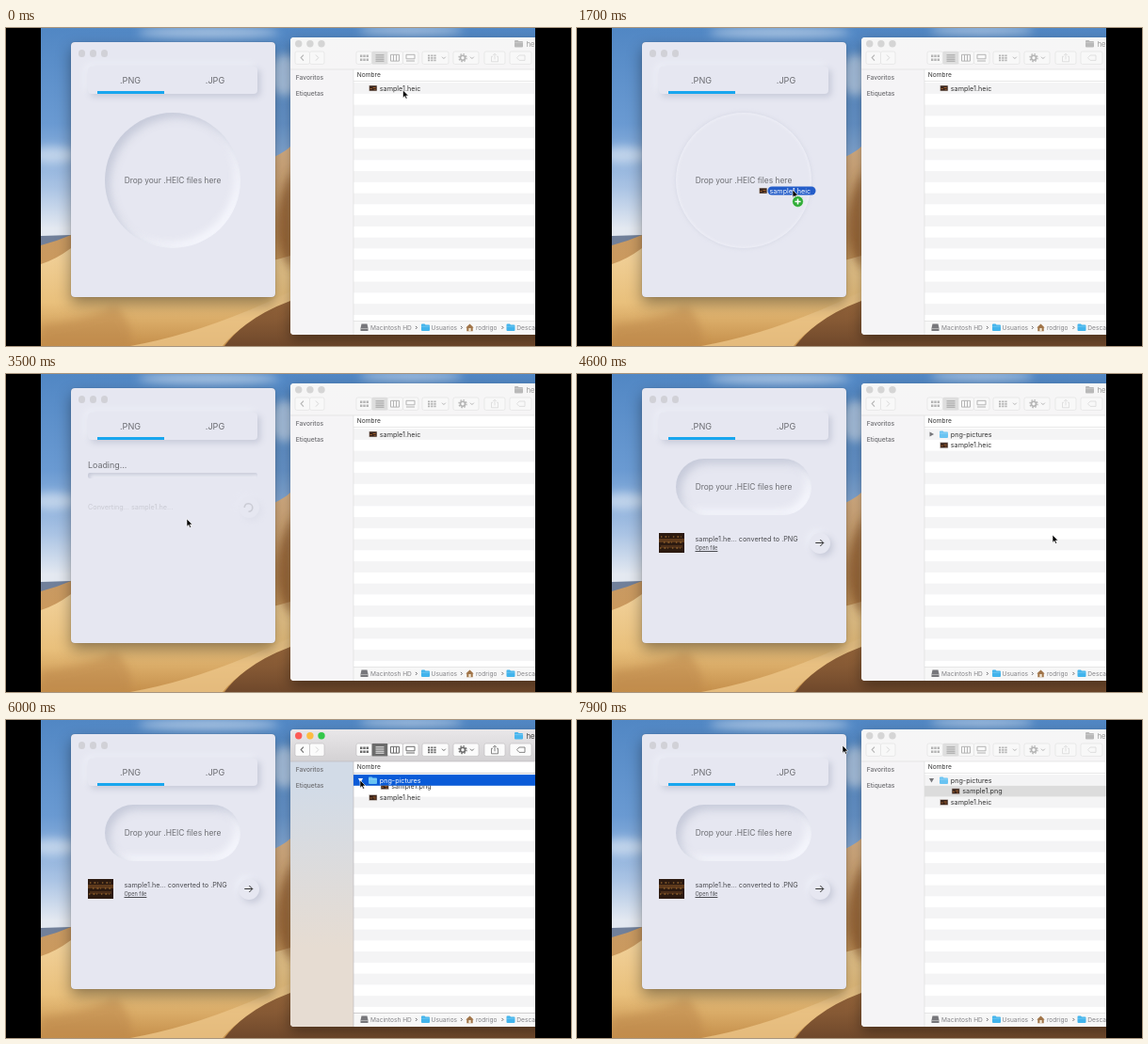
An HTML page that plays this animation: 600 by 338 pixels, repeating every 8 s.

```html
<!DOCTYPE html>
<html lang="es">
<head>
<meta charset="utf-8">
<title>HEIC converter</title>
<style>
html, body { margin: 0; width: 100%; height: 100%; overflow: hidden; background: #000; }
#scene { position: absolute; left: 37px; top: 0; width: 525px; height: 338px; overflow: hidden;
  font-family: Inter, Roboto, sans-serif;
  --bar1: #f6f6f6; --bar2: #f6f5f6; --side1: #f5f4f6; --side2: #f5f4f6; --line: #dfdfdf;
  --glyph: #b4b4b4; --dim: #dadada; --btn: #f8f8f8; --on: #dedede; --onGlyph: #9a9a9a;
  --r: #d5d5d5; --y: #d5d5d5; --g: #d5d5d5; --title: #9c9c9c; --dir: #b9b9b9; --pick: #dcdcdc; --pickText: #333; }
#scene.active {
  --bar1: #e9e7e9; --bar2: #d3d1d3; --side1: #d2dbe7; --side2: #e6dcd2; --line: #bdbbbd;
  --glyph: #6b6b6b; --dim: #6b6b6b; --btn: #fbfbfb; --on: #6c6c6c; --onGlyph: #fff;
  --r: #fc5b57; --y: #fdbc40; --g: #34c84a; --title: #444; --dir: #49b6ee; --pick: #0a5bd8; --pickText: #fff; }
svg { position: absolute; left: 0; top: 0; }
#app { position: absolute; left: 32px; top: 15px; width: 216.5px; height: 271px; border-radius: 4px;
  background: #e6e7f1; color: #6c6d72; box-shadow: 0 7px 16px rgba(0,0,0,.38), 0 0 1px rgba(0,0,0,.4); }
#app div { position: absolute; box-sizing: border-box; white-space: nowrap; }
.dot { top: 8px; width: 7.6px; height: 7.6px; border-radius: 50%; background: #d1d1d7; }
.tabs, .round { box-shadow: 3px 3px 7px #c6c9d8, -3px -3px 7px #eef0f8; background: #e6e7f1; }
.tabs { left: 18px; top: 26px; width: 180px; height: 29px; border-radius: 4px; }
.tab { top: 0; width: 90px; line-height: 29px; text-align: center; font-size: 9.1px; }
.mark { left: 10px; top: 26px; width: 71px; height: 3.4px; background: #18a6ee; }
#ring { left: 36px; top: 75px; width: 144px; display: flex; align-items: center; justify-content: center; font-size: 8.4px; }
.round { left: 177.5px; width: 22px; height: 22px; border-radius: 50%; }
.track { left: 18px; top: 89.5px; width: 180px; height: 6px; border-radius: 2px; box-shadow: inset 2px 2px 4px #c6c9d7, inset -2px -2px 4px #f1f2fa; }
.small { font-size: 7.25px; line-height: 10px; }
</style>
</head>
<body>
<div id="scene">
<svg width="525" height="338" viewBox="37 0 525 338">
  <defs>
    <linearGradient id="sky" x2="0" y2="1">
      <stop offset="0" stop-color="#5187c4"/><stop offset=".3" stop-color="#6a9ad2"/>
      <stop offset=".5" stop-color="#a9c3e4"/><stop offset=".63" stop-color="#e4e9f1"/>
    </linearGradient>
    <linearGradient id="sand" gradientUnits="userSpaceOnUse" x1="0" y1="130" x2="0" y2="338">
      <stop offset="0" stop-color="#dcb488"/><stop offset=".45" stop-color="#c99a62"/><stop offset="1" stop-color="#cf9750"/>
    </linearGradient>
    <linearGradient id="gold" gradientUnits="userSpaceOnUse" x1="0" y1="235" x2="0" y2="338">
      <stop offset="0" stop-color="#f1d19a"/><stop offset=".55" stop-color="#e9c07c"/><stop offset="1" stop-color="#c58f4b"/>
    </linearGradient>
    <linearGradient id="shade" gradientUnits="userSpaceOnUse" x1="0" y1="290" x2="0" y2="338">
      <stop offset="0" stop-color="#98673c"/><stop offset="1" stop-color="#6f482b"/>
    </linearGradient>
    <linearGradient id="bar" x2="0" y2="1">
      <stop offset="0" style="stop-color:var(--bar1)"/><stop offset="1" style="stop-color:var(--bar2)"/>
    </linearGradient>
    <linearGradient id="side" x2="0" y2="1">
      <stop offset=".1" style="stop-color:var(--side1)"/><stop offset=".7" style="stop-color:var(--side2)"/>
    </linearGradient>
    <filter id="soft" x="-20%" y="-20%" width="140%" height="140%"><feGaussianBlur stdDeviation="7"/></filter>
    <filter id="blur" x="-20%" y="-20%" width="140%" height="140%"><feGaussianBlur stdDeviation="5"/></filter>
    <clipPath id="below"><rect x="369" y="69.7" width="200" height="242"/></clipPath>
    <g id="folder">
      <path d="M0 1q0-1 1-1h2.5l1 1H8q1 0 1 1v4.5q0 1-1 1H1q-1 0-1-1z"/>
      <path d="M0 2.6h9" stroke="#fff" stroke-opacity=".4" stroke-width=".6"/>
    </g>
    <g id="photo">
      <path d="M0 0h8.4v6H0z" fill="#38231a" stroke="#e4e0dc" stroke-width=".6"/>
      <path d="M1 3h2v1H1zm3-1h3v1H4zm1 2h2v.8H5z" fill="#a1602d"/>
    </g>
    <path id="arrow" d="M0 0v8.2l1.9-1.8 1.3 2.9 1.4-.6-1.3-2.8h2.6z" fill="#000" stroke="#fff" stroke-width=".6"/>
  </defs>

  <rect x="37" width="525" height="338" fill="url(#sky)"/>
  <g fill="#eaf0f7" opacity=".55" filter="url(#blur)">
    <ellipse cx="215" cy="5" rx="75" ry="6"/><ellipse cx="430" cy="3" rx="55" ry="5"/>
    <ellipse cx="296" cy="50" rx="16" ry="22"/><ellipse cx="50" cy="135" rx="26" ry="9"/>
  </g>
  <path d="M37 221l32-1v12H37z" fill="#71809a"/>
  <path d="M37 231q16-4 32-11 120-6 216-83 12-6 17-11l260-40v252H37z" fill="url(#sand)"/>
  <path d="M37 251q16-5 32-17 130 40 233 8v96H37z" fill="url(#gold)"/>
  <path d="M304 150q-16 30-16 60t16 48z" fill="#8a572c" opacity=".75" filter="url(#blur)"/>
  <path d="M37 316q40-4 80-20 20 20 15 42H37z" fill="#b98449" opacity=".5" filter="url(#blur)"/>
  <path d="M132 338q80-14 170-58v14q-50 16-72 44z" fill="#edc689" opacity=".8"/>
  <path d="M232 338q22-30 70-48h260v48z" fill="url(#shade)"/>

  <rect x="302" y="15" width="270" height="316" rx="4" opacity=".38" filter="url(#soft)"/>
  <rect x="302" y="10" width="280" height="316" rx="4" fill="#fff"/>
  <path d="M302 44h67v282h-63q-4 0-4-4z" fill="url(#side)"/>
  <path d="M302 44V14q0-4 4-4h260v34z" fill="url(#bar)"/>
  <g id="stripes" fill="#f4f4f5"></g>
  <path d="M369 311.5h200V326H369z" fill="#f7f7f7"/>
  <path d="M302 44h260M369 44v282M369 311.5h193M369 56.5h193" fill="none" style="stroke:var(--line)" stroke-width=".7"/>
  <circle cx="310.7" cy="16.8" r="3.7" style="fill:var(--r)"/>
  <circle cx="322.9" cy="16.8" r="3.7" style="fill:var(--y)"/>
  <circle cx="335" cy="16.8" r="3.7" style="fill:var(--g)"/>
  <use href="#folder" x="540" y="13" style="fill:var(--dir)"/>
  <text x="552.5" y="19.8" font-size="7.8" style="fill:var(--title)">heic</text>

  <g id="buttons" style="fill:var(--btn);stroke:var(--line)" stroke-width=".6"></g>
  <rect x="388.7" y="25" width="16.4" height="13.4" style="fill:var(--on)"/>
  <g fill="none" style="stroke:var(--glyph)" stroke-width="1">
    <path d="M316 28.6l-2.8 3 2.8 3" stroke-width="1.1"/>
    <path d="M376 29.8h9M376 33.8h9" stroke-width="2.6" stroke-dasharray="2.4 .9"/>
    <path d="M392.5 28.8h9M392.5 31h9M392.5 33.2h9M392.5 35.2h9" style="stroke:var(--onGlyph)" stroke-width=".9"/>
    <path d="M408.5 28.3h9v6.8h-9zM411.5 28.3v6.8M414.5 28.3v6.8"/>
    <path d="M425 28.3h9v4.5h-9zM425 35h9"/>
    <path d="M448 29.3h8.6M448 31.8h8.6M448 34.3h8.6" stroke-width="1.8" stroke-dasharray="2.2 1"/>
    <path d="M463 30.7l1.9 1.9 1.9-1.9M493 30.7l1.9 1.9 1.9-1.9"/>
    <circle cx="485" cy="31.7" r="2.5" stroke-width="1.6"/>
    <circle cx="485" cy="31.7" r="4" stroke-width="1.3" stroke-dasharray="1.57 1.57"/>
  </g>
  <g fill="none" style="stroke:var(--dim)" stroke-width=".8">
    <path d="M329 28.6l2.8 3-2.8 3" stroke="#cfcfcf" style="stroke:#cfcfcf"/>
    <path d="M517 30.2h-1.5v5.6h7v-5.6H521M519 33.3v-6M517.2 29l1.8-1.8 1.8 1.8"/>
    <path d="M542.5 31.7l2.5-2.7h6v5.4h-6z"/>
  </g>

  <g font-size="6.7" font-weight="500" fill="#6c6c70"><text x="307.7" y="54.9">Favoritos</text><text x="307.7" y="72">Etiquetas</text></g>
  <text x="372.8" y="52.4" font-size="6.6" fill="#333">Nombre</text>

  <rect id="pick" x="369" width="193" height="11.7" style="fill:var(--pick)"/>
  <g font-size="7.2" fill="#333">
    <g id="dirRow">
      <path id="tri" d="M-2-2.6l4.6 2.6-4.6 2.6z"/>
      <use href="#folder" x="385" y="60.4" fill="#69c3f2"/>
      <text id="dirName" x="396.8" y="66.6">png-pictures</text>
    </g>
    <g clip-path="url(#below)"><g id="pngRow">
      <use href="#photo" x="398" y="61"/><text id="pngName" x="409.3" y="66.6">sample1.png</text>
    </g></g>
    <g id="heicRow"><use href="#photo" x="385.6" y="61"/><text x="396.8" y="66.6">sample1.heic</text></g>
  </g>

  <g font-size="6.6" fill="#838387">
    <path d="M377.5 314.5h6l1 4.5v3h-8v-3z" fill="#77777b"/><path d="M376.5 319.5h8" stroke="#d5d5d5" stroke-width=".6"/>
    <text x="387" y="320.7">Macintosh HD</text>
    <use href="#folder" x="441" y="314.6" fill="#42b4ec"/><text x="451.5" y="320.7">Usuarios</text>
    <path d="M488.3 318.5l4.2-4 4.2 4h-1v3.8h-6.4v-3.8z" fill="#a07448"/><path d="M491.3 319h2.4v3.3h-2.4z" fill="#f0e3cf"/>
    <text x="499" y="320.7">rodrigo</text>
    <use href="#folder" x="531.5" y="314.6" fill="#42b4ec"/><text x="542.3" y="320.7">Descargas</text>
    <path d="M435 316.9l1.5 1.5-1.5 1.5M483 316.9l1.5 1.5-1.5 1.5M526.5 316.9l1.5 1.5-1.5 1.5" fill="none" stroke="#66666a" stroke-width="1"/>
  </g>
</svg>

<div id="app">
  <div class="dot" style="left:7.7px"></div><div class="dot" style="left:19.8px"></div><div class="dot" style="left:31.9px"></div>
  <div class="tabs">
    <div class="tab">.PNG</div><div class="tab" style="left:90px">.JPG</div><div class="mark"></div>
  </div>
  <div id="ring">Drop your .HEIC files here</div>
  <div id="loading">
    <div style="left:18px;top:75px;font-size:8.9px;line-height:13px">Loading...</div>
    <div class="track"></div>
    <div id="job">
      <div class="small" style="left:18px;top:122.4px">Converting... sample1.he...</div>
      <div class="round" style="top:116px"></div>
      <svg width="216" height="160"><path id="spin" d="M4.3 0a4.3 4.3 0 1 1-4.3-4.3" fill="none" stroke="#77787e" stroke-width="1.6"/></svg>
    </div>
  </div>
  <div id="done">
    <div class="small" style="left:56.5px;top:155.7px;color:#4b4c51">sample1.he... converted to .PNG</div>
    <div style="left:56.5px;top:166px;font-size:5.6px;line-height:8px;color:#4b4c51;text-decoration:underline">Open file</div>
    <div class="round" style="top:153.5px"></div>
    <svg width="216" height="200">
      <path d="M18 154h27v21H18z" fill="#2c1a10"/>
      <path d="M18 160h27v4H18z" fill="#5e3a1c"/><path d="M20 167h23v3H20z" fill="#4d2f19"/>
      <path d="M20 158h22M23 164h19M19 170h23" stroke="#a87435" stroke-width="1.4" stroke-dasharray="1.4 3 2 1.7 .8 4" opacity=".75"/>
      <path d="M184.3 164.5h8.5M189.3 161l3.5 3.5-3.5 3.5" fill="none" stroke="#333" stroke-width="1"/>
    </svg>
  </div>
</div>

<svg width="525" height="338" viewBox="37 0 525 338">
  <g id="ghost">
    <use href="#photo" x="-35.5" y="-2"/>
    <rect x="-26.5" y="-3.5" width="51" height="9" rx="4.5" fill="#245dc9"/>
    <text x="-24.5" y="3.5" font-size="7.2" fill="#fff">sample1.heic</text>
  </g>
  <use id="cursor" href="#arrow"/>
  <g id="plus">
    <circle cx="5.5" cy="12.5" r="5.9" fill="#2fac37" stroke="#fff" stroke-width=".6"/>
    <path d="M2.4 12.5h6.2M5.5 9.4v6.2" stroke="#fff" stroke-width="1.6"/>
  </g>
</svg>
</div>

<script>
const $ = id => document.getElementById(id);
const ROW = 11.75, LOOP = 8000;
const GRAB = 500, HOVER = 1250, DROP = 2700, SAVED = 4150, DONE = 4250;
const FOCUS = 5600, OPEN = 5880, SELECT = 6750, BLUR = 7700;

// time, x, y of the pointer tip
const path = [
  [0, 421.5, 66], [500, 421.5, 66], [1500, 229, 172], [1800, 229, 172], [2500, 192, 154],
  [3600, 192, 154], [4500, 505, 171], [4700, 505, 171], [5500, 376, 64], [6250, 376, 64],
  [6700, 404, 76], [7150, 404, 76], [7750, 282, 27], [8000, 282, 27]
];

const clamp = v => Math.max(0, Math.min(1, v));
const ramp = (t, from, length) => { const k = clamp((t - from) / length); return k * k * (3 - 2 * k); };
const show = (id, on) => $(id).style.display = on ? '' : 'none';
const move = (id, x, y, extra = '') => $(id).setAttribute('transform', `translate(${x} ${y})${extra}`);

function pointer(t) {
  const i = path.findIndex(p => p[0] > t);
  const [t0, x0, y0] = path[i - 1], [t1, x1, y1] = path[i], k = ramp(t, t0, t1 - t0);
  return [x0 + (x1 - x0) * k, y0 + (y1 - y0) * k];
}

function build() {
  for (let i = 0; i < 22; i += 2)
    $('stripes').innerHTML += `<rect x="369" y="${58.1 + i * ROW}" width="193" height="${ROW}"/>`;
  for (const [x, w] of [[307, 15.5], [322.5, 15.5], [372, 16.5], [388.5, 16.5], [405, 16.5], [421.5, 16.5], [442, 28], [475, 27], [508, 22], [535, 23]])
    $('buttons').innerHTML += `<rect x="${x}" y="25" width="${w}" height="13.4" rx="1.8"/>`;
}

function drawFinder(t) {
  const saved = t >= SAVED, active = t >= FOCUS && t < BLUR, second = t >= SELECT;
  const open = ramp(t, OPEN, 220);
  $('scene').classList.toggle('active', active);
  show('dirRow', saved);
  show('pngRow', t >= OPEN);
  move('pngRow', 0, ROW * open);
  move('heicRow', 0, saved ? ROW * (1 + open) : 0);
  show('pick', t >= FOCUS);
  $('pick').setAttribute('y', 58.1 + (second ? ROW : 0));
  $('dirName').style.fill = t >= FOCUS && !second ? 'var(--pickText)' : '';
  $('pngName').style.fill = second ? 'var(--pickText)' : '';
  $('pngName').style.fontWeight = second && active ? 500 : 400;
  $('tri').style.fill = t >= FOCUS && !second ? '#fff' : '#77777b';
  move('tri', 376.5, 64, ` rotate(${90 * ramp(t, OPEN, 100)})`);
}

function drawApp(t) {
  const done = t >= DONE, hover = done ? 0 : ramp(t, HOVER, 250);
  const ring = $('ring').style, height = done ? 60 : 144;
  show('ring', t < DROP || done);
  show('loading', t >= DROP && !done);
  show('done', done);
  ring.height = height + 'px';
  ring.borderRadius = height / 2 + 'px';
  ring.boxShadow = `inset 5px 5px 10px rgba(192,196,213,${.85 * (1 - hover)}), inset -5px -5px 10px rgba(248,249,255,${.9 * (1 - hover)}),
    0 0 4px rgba(200,203,219,${.6 * hover}), inset 0 0 4px rgba(250,250,255,${.7 * hover})`;
  $('job').style.opacity = ramp(t, 3250, 800);
  move('spin', 188.5, 127, ` rotate(${t * .36})`);
}

function frame(now) {
  const t = now % LOOP, [x, y] = pointer(t);
  drawFinder(t);
  drawApp(t);
  move('cursor', x, y);
  move('ghost', x, y);
  move('plus', x, y);
  show('ghost', t >= GRAB && t < DROP);
  show('plus', t >= HOVER && t < DROP);
  requestAnimationFrame(() => frame(performance.now() - start));
}

build();
const start = performance.now();
frame(0);
</script>
</body>
</html>
```
